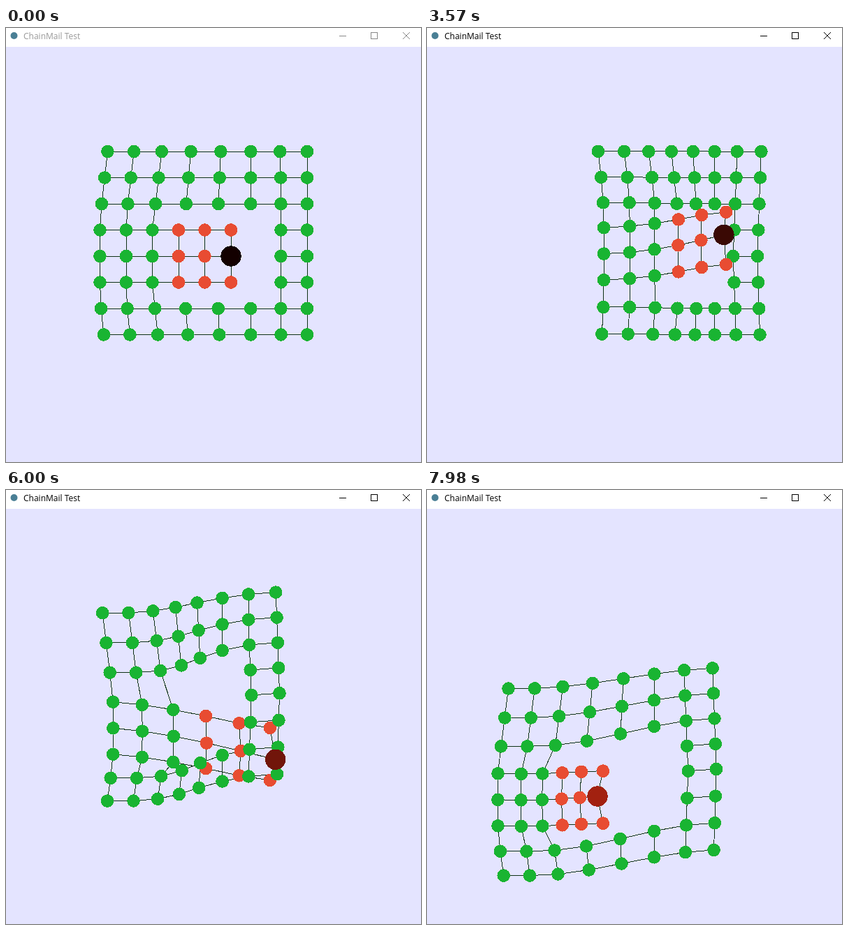
An HTML page for the animation above (8 s loop, 594x622 px).

```html
<!DOCTYPE html>
<html lang="en">
<head>
<meta charset="utf-8">
<title>ChainMail Test</title>
<style>
  html, body { margin: 0; width: 100%; height: 100%; overflow: hidden; background: #e4e4ff; }
  svg { display: block; }
  text { font: 12px "Open Sans", "Noto Sans", sans-serif; }
  #links, #nodes { shape-rendering: crispEdges; }
  #links { stroke: #0f3216; stroke-width: 1; fill: none; }
  #buttons { fill: none; stroke-width: 1; }
</style>
</head>
<body>
<svg width="594" height="622" viewBox="0 0 594 622">
  <rect width="594" height="622" fill="#e4e4ff"/>
  <rect width="594" height="27" fill="#fff"/>
  <circle cx="11.5" cy="11" r="5" fill="#4a7f95"/>
  <text id="title" x="25" y="16">ChainMail Test</text>
  <g id="buttons">
    <path d="M477 11.5h10M522.5 6.5h9v9h-9z" shape-rendering="crispEdges"/>
    <path d="M568 6l10 10M578 6l-10 10"/>
  </g>
  <path id="links"/>
  <g id="nodes"></g>
</svg>
<script>
const N = 8, GAP = 37.5, LOOP = 8000, TICK = 30, WAKE = 150;
const HELD = { row: 4, col: 5 };

// Key points of the drag: time, x, y.
const PATH = [
  [360, 322, 327], [1470, 200, 328], [1740, 194, 328], [2580, 322, 323],
  [2940, 397, 313], [3270, 493, 305], [3450, 446, 300], [4320, 318.5, 268],
  [4890, 221.5, 172], [5520, 286.5, 244.5], [5910, 371, 367],
  [6540, 454.5, 471.5], [6960, 476, 495], [7980, 244, 439]
];

const clamp = (v, lo, hi) => Math.min(hi, Math.max(lo, v));
const softMax = (a, b, k) => Math.max(a, b) + k * Math.log(1 + Math.exp(-Math.abs(a - b) / k));

function secant(i, axis) {
  if (i < 0) return 0;
  const k = Math.min(i, PATH.length - 2), a = PATH[k], b = PATH[k + 1];
  return (b[axis] - a[axis]) / (b[0] - a[0]);
}

function slope(i, axis) {
  const l = secant(i - 1, axis), r = secant(i, axis);
  return l * r > 0 ? 2 * l * r / (l + r) : 0;
}

// Monotone cubic through the key points.
function pointer(t, axis) {
  let i = 0;
  while (i < PATH.length - 2 && t > PATH[i + 1][0]) i++;
  const a = PATH[i], b = PATH[i + 1], h = b[0] - a[0];
  const s = clamp((t - a[0]) / h, 0, 1), q = 1 - s;
  return a[axis] * (1 + 2 * s) * q * q + b[axis] * s * s * (3 - 2 * s)
    + h * s * q * (slope(i, axis) * q - slope(i + 1, axis) * s);
}

// How far a node may lag behind the held one: it rises along the dragged arm,
// then on around the cut towards the free right edge.
function slackAt(row, col) {
  const off = row - HELD.row;
  if (Math.abs(off) < 2 && col <= HELD.col) {
    return 46 * Math.sin(0.27 * Math.hypot(HELD.col - col, 0.63 * off));
  }
  const v = off < 0 ? -off : 0.9 * off;
  const turn = clamp((0.58 - 0.03 * v) * (col - 4.05), -Math.PI / 2, Math.PI / 2);
  return 67 + 2 * v + (28 - 3.25 * v) * Math.sin(turn);
}

const nodes = [];
for (let row = 0; row < N; row++) {
  for (let col = 0; col < N; col++) {
    const slack = slackAt(row, col);
    const reach = softMax(slack, 48.5, 5);
    const lagX = clamp(0.81 * slack - 37.5, 0, 34);
    nodes.push({
      row, col,
      give: slack / reach,
      limits: [reach - 6, reach + 6],
      home: [0, (col - HELD.col) * GAP, (row - HELD.row) * GAP],
      lags: [[], [lagX, lagX], [0, 0]],
      inner: row > 2 && row < 6 && col > 2 && col < 6,
      held: row === HELD.row && col === HELD.col
    });
  }
}

// Each node stays put until the pointer has used up its slack;
// the mean of a tight and a loose limit softens the stop.
function simulate() {
  const frames = [];
  let last = [0, pointer(0, 1), pointer(0, 2)];
  for (let t = 0; t < LOOP; t += TICK) {
    const now = [0, pointer(t, 1), pointer(t, 2)];
    frames.push(nodes.map(n => [1, 2].map(k => {
      n.lags[k] = n.limits.map((m, j) => clamp(n.lags[k][j] - now[k] + last[k], -m, m));
      const lag = (n.lags[k][0] + n.lags[k][1]) / 2;
      return now[k] + n.home[k] + lag * n.give;
    })));
    last = now;
  }
  return frames;
}

// The inner patch is joined to the rest on its left side only.
const links = [];
nodes.forEach((n, i) => {
  const joined = j => n.inner === nodes[j].inner;
  if (n.col < N - 1 && (joined(i + 1) || n.col === 2)) links.push([i, i + 1]);
  if (n.row < N - 1 && joined(i + N)) links.push([i, i + N]);
});

const $ = id => document.getElementById(id);
const dots = nodes.map(n => {
  const dot = document.createElementNS("http://www.w3.org/2000/svg", "circle");
  dot.setAttribute("r", n.held ? 14.7 : 9.3);
  dot.setAttribute("fill", n.inner ? "#e84c32" : "#19b432");
  $("nodes").append(dot);
  return dot;
});
const ball = dots[HELD.row * N + HELD.col];
$("nodes").append(ball);

const frames = simulate();

function draw(time) {
  const tick = time < WAKE ? 0 : Math.floor(time / TICK);
  const points = frames[tick];
  points.forEach(([x, y], i) => {
    dots[i].setAttribute("cx", x.toFixed(2));
    dots[i].setAttribute("cy", y.toFixed(2));
  });
  const at = i => points[i].map(v => v.toFixed(2)).join(" ");
  $("links").setAttribute("d", links.map(([a, b]) => `M${at(a)}L${at(b)}`).join(""));

  const glow = (1 - Math.cos(0.27 + 4.94 * tick * TICK / 1000)) / 2;
  ball.setAttribute("fill", `rgb(${16 + 208 * glow | 0},${47 * glow | 0},${23 * glow | 0})`);

  const active = time >= WAKE;
  $("title").setAttribute("fill", active ? "#000" : "#999");
  $("buttons").setAttribute("stroke", active ? "#000" : "#888");
}

const start = performance.now();
function loop() {
  draw((performance.now() - start) % LOOP);
  requestAnimationFrame(loop);
}
loop();
</script>
</body>
</html>
```
